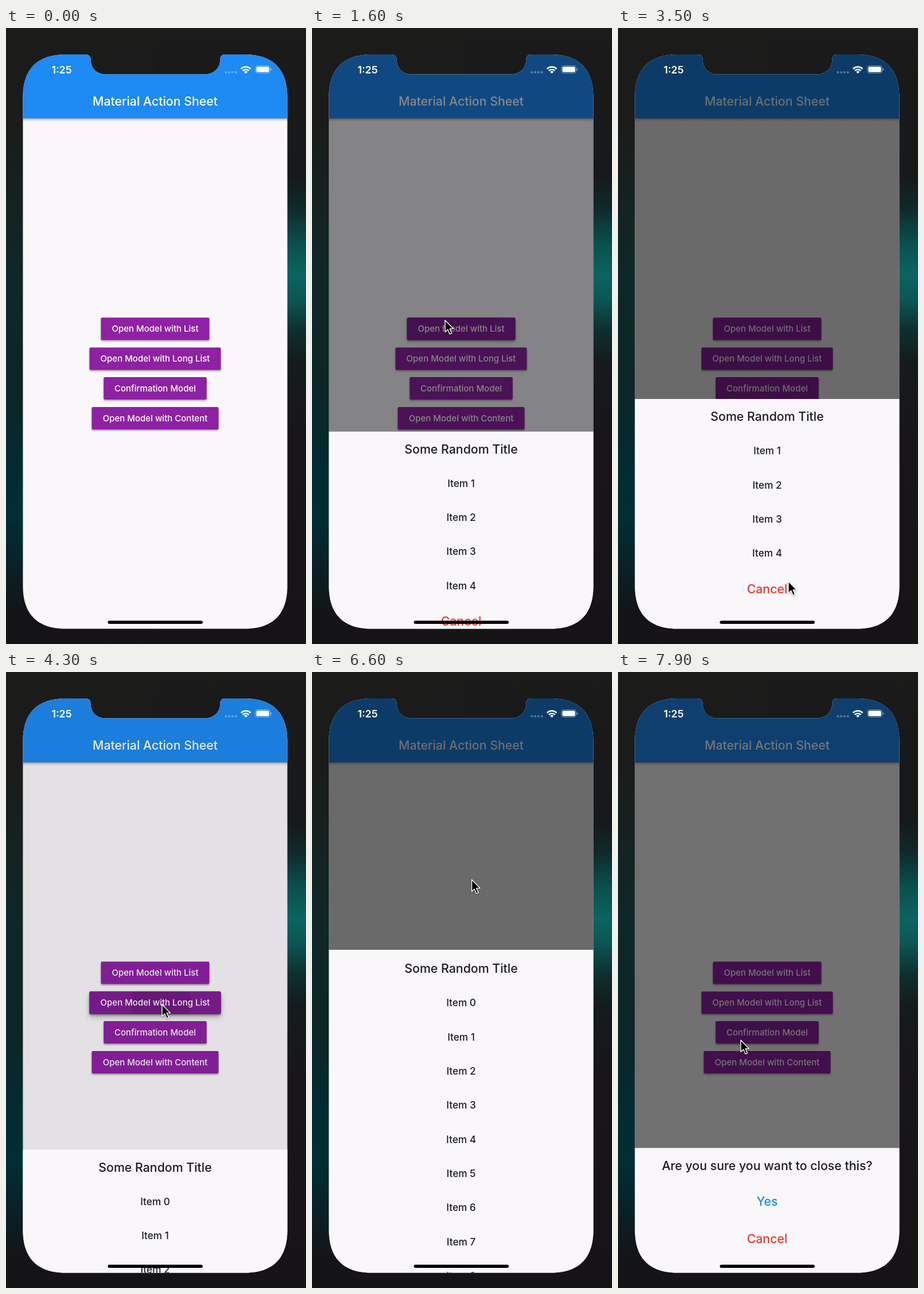
Recreate the animation shown at these times as an HTML page. Size 523 by 1071 pixels, loop 8 s.

```html
<!DOCTYPE html>
<html lang="en">
<head>
<meta charset="utf-8">
<title>Action sheet demo</title>
<style>
  html, body { margin: 0; width: 100%; height: 100%; overflow: hidden; background: #191819; }
  #stage { display: block; width: 100%; height: 100%; }
  text { font-family: Inter, "Liberation Sans", sans-serif; font-weight: 500; text-anchor: middle; }
  .btn { filter: drop-shadow(0 2px 1.5px rgba(0, 0, 0, .36)); }
  .cursor { filter: drop-shadow(0 1.5px 1.5px rgba(0, 0, 0, .35)); }
</style>
</head>
<body>
<svg id="stage" viewBox="0 0 523 1071">
  <defs>
    <linearGradient id="leftGlow" x2="0" y2="1">
      <stop offset="0" stop-color="#1b1b1a"/>
      <stop offset=".16" stop-color="#1a1c1a"/>
      <stop offset=".3" stop-color="#132322"/>
      <stop offset=".4" stop-color="#0f2728"/>
      <stop offset=".58" stop-color="#0c2527"/>
      <stop offset=".73" stop-color="#022c32"/>
      <stop offset=".8" stop-color="#012d33"/>
      <stop offset=".88" stop-color="#0a2025"/>
      <stop offset=".95" stop-color="#141416"/>
      <stop offset="1" stop-color="#161317"/>
    </linearGradient>
    <linearGradient id="rightGlow" x2="0" y2="1">
      <stop offset="0" stop-color="#1b1b1a"/>
      <stop offset=".1" stop-color="#19191a"/>
      <stop offset=".24" stop-color="#16191a"/>
      <stop offset=".29" stop-color="#10282a"/>
      <stop offset=".35" stop-color="#0a504e"/>
      <stop offset=".4" stop-color="#0a6461"/>
      <stop offset=".44" stop-color="#0a5755"/>
      <stop offset=".49" stop-color="#0e302f"/>
      <stop offset=".54" stop-color="#151b1c"/>
      <stop offset=".65" stop-color="#18161a"/>
      <stop offset="1" stop-color="#161317"/>
    </linearGradient>
    <linearGradient id="barShade" x2="0" y2="1">
      <stop offset="0" stop-opacity=".36"/>
      <stop offset=".4" stop-opacity=".14"/>
      <stop offset="1" stop-opacity="0"/>
    </linearGradient>
    <clipPath id="screen">
      <path d="M29.5 120C29.5 72 54 46 104 46H137C145 46 147.5 49 147.5 54C147.5 70 158 80.5 174 80.5H346.5
        C362 80.5 373.500 70 373.500 54C373.500 49 376 46 383 46H416C466 46 490.500 72 490.500 120V970.500
        C490.500 1018.500 466 1044.500 416 1044.500H104C54 1044.500 29.500 1018.500 29.500 970.500Z"/>
    </clipPath>
  </defs>
  <rect width="261" height="1071" fill="url(#leftGlow)"/>
  <rect x="261" width="262" height="1071" fill="url(#rightGlow)"/>
  <g clip-path="url(#screen)">
    <rect x="29" y="46" width="462" height="999" fill="#f9f7fa"/>
    <rect x="29" y="157" width="462" height="6" fill="url(#barShade)"/>
    <rect x="29" y="46" width="462" height="111" fill="#1e8af3"/>
    <g id="page"></g>
    <rect id="scrim" x="29" y="46" width="462" height="999"/>
    <g id="sheets"></g>
  </g>
  <g fill="#fff">
    <text x="97" y="78.800" style="font-size:17.800px;font-weight:600">1:25</text>
    <g opacity=".3">
      <circle cx="383.300" cy="77" r="2.100"/><circle cx="389.100" cy="77" r="2.100"/>
      <circle cx="394.900" cy="77" r="2.100"/><circle cx="400.700" cy="77" r="2.100"/>
    </g>
    <g fill="none" stroke="#fff" stroke-width="2.500">
      <path d="M409.700 71A12 12 0 0 1 426.500 71"/>
      <path d="M412.700 74.300A7.700 7.700 0 0 1 423.500 74.300"/>
    </g>
    <path d="M418.100 79.200L415.100 76.200A4.300 4.300 0 0 1 421.100 76.200Z"/>
    <rect x="434.700" y="65.500" width="25.800" height="13" rx="4" fill="none" stroke="#fff" stroke-opacity=".45"/>
    <rect x="436.400" y="67.200" width="22.400" height="9.600" rx="2.500"/>
    <path d="M461.800 70V74.500Q463.500 73.800 463.500 72.200T461.800 70" opacity=".5"/>
  </g>
  <rect x="177.500" y="1030.500" width="165.500" height="5.500" rx="2.750"/>
  <path id="cursor" class="cursor" d="M0 0V20.500L4.700 16.200L8.100 24.200L11.600 22.700L8.200 14.900H14.600Z"
    stroke="#fff" stroke-width="1.400" stroke-linejoin="round"/>
</svg>
<script>
const LOOP = 8000, STEP = 100, OPEN = 250, CLOSE = 200, DIM = .57, BOTTOM = 1045, MID = 260;
const INK = '#1d1c1f', RED = '#e53a37', BLUE = '#1f8ae6', TITLE = 21.3, ITEM = 17.2, GAP = 59.33;
const $ = id => document.getElementById(id);

function add(parent, tag, attrs, label) {
  const el = document.createElementNS('http://www.w3.org/2000/svg', tag);
  for (const key in attrs) el.setAttribute(key, attrs[key]);
  if (label) el.textContent = label;
  parent.appendChild(el);
  return el;
}

// Text centred on the phone, with the middle of its capitals at y
function label(parent, str, y, size, fill) {
  return add(parent, 'text', { x: MID, y: y + size * .364, fill, style: `font-size:${size}px` }, str);
}

const clamp = v => Math.min(1, Math.max(0, v));

function bezier(x1, y1, x2, y2) {
  const at = (a, b, s) => 3 * (1 - s) * (1 - s) * s * a + 3 * (1 - s) * s * s * b + s * s * s;
  return x => {
    if (x <= 0 || x >= 1) return clamp(x);
    let lo = 0, hi = 1;
    for (let i = 0; i < 24; i++) {
      const m = (lo + hi) / 2;
      if (at(x1, x2, m) < x) lo = m; else hi = m;
    }
    return at(y1, y2, lo);
  };
}
const slide = bezier(0, 0, .2, 1);
const ease = bezier(.25, .1, .25, 1);

// Smooth passage through keys of the form [time, ...values]
function track(keys, t) {
  let i = 0;
  while (i < keys.length - 2 && t > keys[i + 1][0]) i++;
  const [a, b] = [keys[i], keys[i + 1]];
  const u = clamp((t - a[0]) / (b[0] - a[0])), s = u * u * (3 - 2 * u);
  return a.slice(1).map((v, k) => v + (b[k + 1] - v) * s);
}

label($('page'), 'Material Action Sheet', 127, TITLE, '#fff');

const buttons = [
  ['Open Model with List', 189, 503.5],
  ['Open Model with Long List', 229, 555.5],
  ['Confirmation Model', 179.5, 607],
  ['Open Model with Content', 221, 659]
].map(([name, width, y], i) => {
  const box = { x: MID - width / 2, y, width, height: 39, rx: 2.2 };
  const clip = add(document.querySelector('defs'), 'clipPath', { id: 'b' + i });
  add(clip, 'rect', box);
  const g = add($('page'), 'g', {});
  const lift = add(g, 'rect', { ...box, style: 'filter:drop-shadow(0 5px 5px rgba(0,0,0,.35))' });
  add(g, 'rect', { ...box, fill: '#8e21a4', class: 'btn' });
  const shade = add(g, 'rect', { ...box, opacity: 0 });
  const wave = add(add(g, 'g', { 'clip-path': `url(#b${i})` }), 'circle', { opacity: 0 });
  label(g, name, y + 19.2, 15, '#fff');
  return { lift, shade, wave };
});

const items = (from, to) => Array.from({ length: to - from + 1 }, (_, i) =>
  ['Item ' + (from + i), 90 + GAP * i, ITEM, INK]);

const heading = ['Some Random Title', 30.5, TITLE, INK];
const sheets = [
  { open: 1468, close: 3600, height: 400, press: [0, 232, 520],
    rows: [heading, ...items(1, 4), ['Cancel', 330, TITLE, RED]] },
  { open: 4266, close: 6680, height: 562, press: [1, 270, 575],
    rows: [heading, ...items(0, 10), ['Cancel', 745.3, TITLE, RED]] },
  { open: 7720, close: 9000, height: 228, press: [2, 214, 640],
    rows: [['Are you sure you want to close this?', 30.5, TITLE, INK],
      ['Yes', 93, TITLE, BLUE], ['Cancel', 158, TITLE, RED]] }
];
for (const s of sheets) {
  s.view = add($('sheets'), 'svg', { width: 523, height: s.height, overflow: 'hidden' });
  add(s.view, 'rect', { width: 523, height: s.height, fill: '#f9f7fa' });
  s.list = add(s.view, 'g', {});
  for (const [str, y, size, fill] of s.rows) label(s.list, str, y, size, fill);
}

const scroll = [[4680, 0], [5040, 297], [5400, 253], [5600, 253], [6050, -12], [6600, -2], [6900, 0]];
const pointer = [
  [100, 330, -40], [1000, 232, 508], [2300, 232, 508], [3300, 297, 962], [3640, 297, 962],
  [4120, 272, 578], [4340, 272, 578], [4640, 288, 850], [5000, 287, 632], [5200, 286, 580],
  [5550, 285, 580], [5980, 283, 800], [6500, 278.5, 361], [6800, 278.5, 361],
  [7500, 214, 640], [8000, 214, 640]
];

function press(s, t) {
  const { lift, shade, wave } = buttons[s.press[0]];
  const since = t - (s.open - 116);
  const on = since < 0 ? 0 : Math.min(1, since / 60) * (1 - clamp((t - s.open) / 200));
  lift.setAttribute('opacity', on);
  shade.setAttribute('opacity', .11 * on);
  wave.setAttribute('cx', s.press[1]);
  wave.setAttribute('cy', s.press[2]);
  wave.setAttribute('r', Math.max(0, since * .35));
  wave.setAttribute('opacity', .14 * on);
}

function draw(t) {
  let dim = 0;
  for (const s of sheets) {
    const p = t < s.close ? clamp((t - s.open) / OPEN) : 1 - clamp((t - s.close) / CLOSE);
    dim = Math.max(dim, ease(p) * DIM);
    s.view.setAttribute('y', BOTTOM - s.height * slide(p));
    s.view.setAttribute('visibility', p > 0 ? 'visible' : 'hidden');
    press(s, t);
  }
  sheets[1].list.setAttribute('transform', `translate(0 ${-track(scroll, t)[0]})`);
  $('scrim').setAttribute('opacity', dim);
  $('cursor').setAttribute('transform', `translate(${track(pointer, t)})`);
}

buttons.forEach(b => b.lift.setAttribute('opacity', 0));
const start = performance.now();
function tick() {
  const t = (performance.now() - start) % LOOP;
  draw(Math.floor(t / STEP) * STEP);
  requestAnimationFrame(tick);
}
tick();
</script>
</body>
</html>
```
